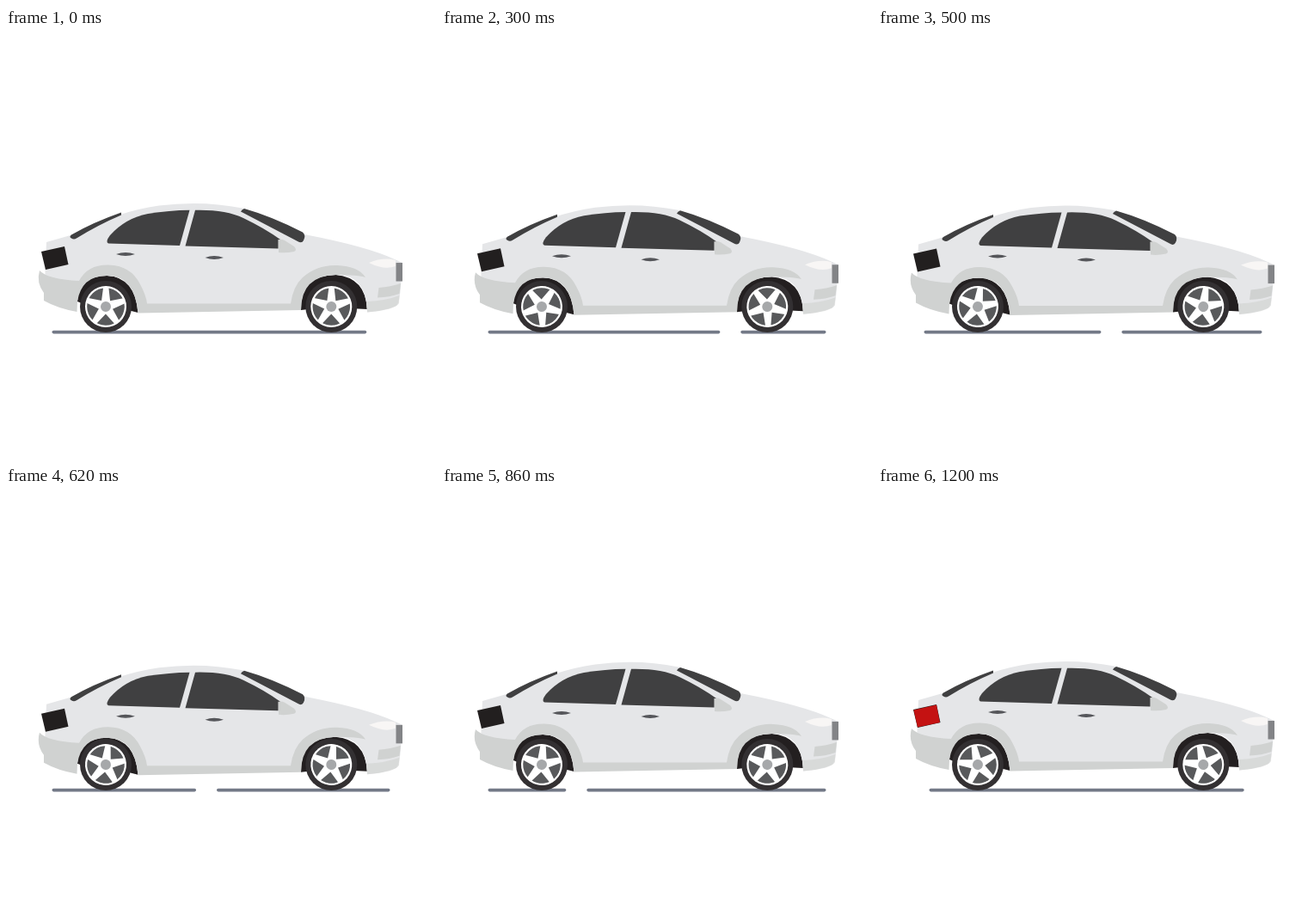
Recreate the animation shown at these times as an HTML page. Size 500 by 500 pixels, loop 1.22 s.

```html
<!DOCTYPE html>
<html lang="en">
<head>
<meta charset="utf-8">
<style>
  html, body { margin: 0; height: 100%; overflow: hidden; background: #fff; }
  svg { display: block; width: 100%; height: 100%; }
</style>
</head>
<body>
<svg viewBox="0 0 500 500">
  <defs>
    <g id="wheel">
      <circle r="24" fill="#fff"/>
      <circle r="21.8" fill="#58595b"/>
      <path id="star" fill="#fff"/>
      <circle r="6" fill="#a6a8aa"/>
    </g>
  </defs>

  <path id="road" d="M55.3 353.6H444.7" stroke="#737987" stroke-width="3.6" stroke-linecap="round" stroke-dasharray="362.5 27.5"/>

  <g id="car">
    <path fill="#231f20" d="M83 318Q84 288 118 288Q150 290 153.500 331L130 325H100ZM343 328Q342 287 383 287Q418 290 420 327L400 326H360Z"/>
    <path fill="#e5e6e8" d="M47 249L75 241Q130 213 178 206.500Q228 200 275 209.500Q314 221 347 240Q420 254 452 269L461 273L459 300Q458 318 454 323Q440 329 420 330.500Q419 287 384 287Q343 288 343 321H153Q150 288 117 288Q88 288 83 300L45 296Z"/>
    <g fill="#d0d2d1">
      <path d="M39 282Q48 292 85 294Q95 275 119 275.500Q145 276 156 298Q163 311 164 320.500H331Q334 300 345 290Q362 275 385 276Q410 277 418 290Q410 287 384 287Q343 288 343 328L153.500 331.500Q150 288 117 288Q88 288 83 318L82.500 330Q60 326 44 317V308Q35 296 39 282Z"/>
      <path d="M419 318Q442 317 457.500 311L457 320Q452 328 420 330.500Z" opacity=".6"/>
      <path d="M433.500 302Q447 301 459 297L457.500 309Q446 313 432 313.500Z"/>
      <path d="M317 246Q320 245 324 247L335 254Q339 258 335 260Q325 262 317 261Z"/>
    </g>
    <g fill="#404041">
      <path d="M119 250.500Q115 249 121 241Q139 221 165 216Q190 212 213.500 211.800L202 253Z"/>
      <path d="M220 211.800Q255 211 276 221Q301 233 319 246L316.500 246V256.500L208.500 253.500Z"/>
      <path d="M273 213.500Q274 211 277 210Q309 219 345 237.500Q349 241 346 247Q344 251 339 248L275 214.500Z"/>
      <path d="M134 214.500Q101 226 76 240.500Q73 243 76 244.500Q79 246.500 82 244.500Q107 229 134 217.500Z"/>
    </g>
    <path fill="#55565a" d="M128 263Q139 259 150 263Q139 267 128 263ZM231.500 267Q242 263 253 267Q242 271 231.500 267Z"/>
    <path fill="#f8f6f5" d="M422 273Q439 266 453 270V277Q440 282 422 273Z"/>
    <path fill="#838487" d="M453.500 273H461V294.500H453.500Z"/>
    <path fill="#221f1f" d="M41 260L68 254L72.500 275L46 281Z"/>
    <path id="light" fill="#c41212" d="M41.500 260.500L68 254.500L72 275L46 280.500Z"/>
  </g>

  <g fill="#333032"><circle cx="116" cy="324" r="30"/><circle cx="378.300" cy="324" r="30"/></g>
  <g transform="translate(116 324)"><use class="spin" href="#wheel"/></g>
  <g transform="translate(378.300 324)"><use class="spin" href="#wheel"/></g>
</svg>
<script>
  const LOOP = 1220, TURNS = 2, BOUNCES = 3;
  const $ = id => document.getElementById(id);
  const wheels = document.querySelectorAll('.spin');

  const polar = (r, deg) => {
    const a = deg * Math.PI / 180;
    return [r * Math.sin(a), -r * Math.cos(a)].map(v => v.toFixed(2)).join(' ');
  };
  const points = [0, 72, 144, 216, 288].flatMap(a =>
    [polar(8.5, a - 36), polar(22.5, a - 8), polar(22.5, a + 8)]);
  $('star').setAttribute('d', `M${points.join('L')}Z`);

  function draw(now) {
    const t = now % LOOP, p = t / LOOP;
    const drop = 2.5 - 2.5 * Math.cos(2 * Math.PI * BOUNCES * (t + 10) / LOOP);
    const blink = t % 1000;
    $('car').setAttribute('transform', `translate(0 ${drop})`);
    $('road').setAttribute('stroke-dashoffset', 390 * p);
    $('light').setAttribute('visibility', blink > 10 && blink < 250 ? 'visible' : 'hidden');
    wheels.forEach(w => w.setAttribute('transform', `rotate(${360 * TURNS * p})`));
  }

  const start = performance.now();
  (function tick() {
    draw(performance.now() - start);
    requestAnimationFrame(tick);
  })();
</script>
</body>
</html>
```
